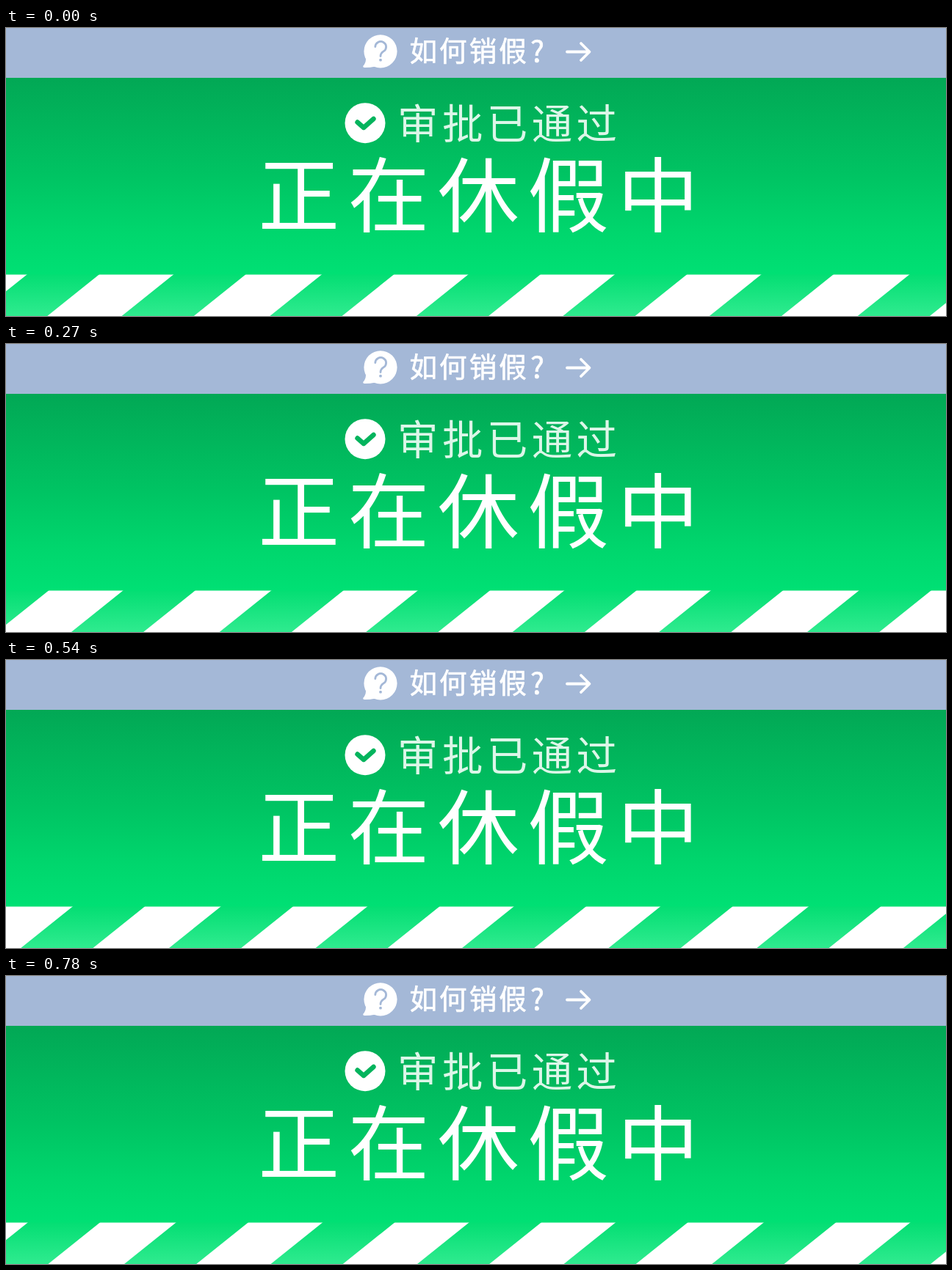
Recreate the animation shown at these times as an HTML page. Size 1280 by 393 pixels, loop 810 ms.

```html
<!DOCTYPE html>
<html lang="zh-CN">
<head>
<meta charset="utf-8">
<title>正在休假中</title>
<style>
  html, body { margin: 0; width: 100%; height: 100%; overflow: hidden; background: #fff; }
  svg { display: block; width: 100%; height: 100%; }
  text { font-family: "Noto Sans CJK SC", "Noto Sans CJK", sans-serif; fill: #fff; }
  .line { fill: none; stroke-linecap: round; stroke-linejoin: round; }
  .medium { font-size: 37.5px; letter-spacing: 3.1px; stroke: #fff; stroke-width: .7; }
  .status { font-size: 55.5px; letter-spacing: 5.4px; font-weight: 300; fill: #dcf6e8; }
  .headline { font-size: 111px; letter-spacing: 11.3px; }
</style>
</head>
<body>
<svg viewBox="0 0 1280 393">
  <defs>
    <linearGradient id="panel" x1="0" y1="0" x2="0" y2="1">
      <stop offset="0" stop-color="#02a855"/>
      <stop offset=".5" stop-color="#00c463"/>
      <stop offset=".78" stop-color="#00d66d"/>
      <stop offset="1" stop-color="#00e074"/>
    </linearGradient>
    <linearGradient id="band" gradientUnits="userSpaceOnUse" x1="0" y1="336" x2="0" y2="393">
      <stop offset="0" stop-color="#04de73"/>
      <stop offset="1" stop-color="#2feb8f"/>
    </linearGradient>
  </defs>

  <rect y="336" width="1280" height="57" fill="#fff"/>
  <path id="stripes" fill="url(#band)"/>
  <rect y="68" width="1280" height="268.5" fill="url(#panel)"/>
  <rect width="1280" height="68" fill="#a4b8d7"/>

  <circle cx="510" cy="31.8" r="22.6" fill="#fff"/>
  <path d="M490 42 Q490 48 486.5 51.5 Q485.5 54 488.5 54 Q496 54 503 52.5 Z" fill="#fff"/>
  <path class="line" d="M502.8 25.5 a7.4 7.2 0 1 1 11.2 6.4 q-4 2.6 -4 6.6" stroke="#a4b8d7" stroke-width="2.8"/>
  <circle cx="510" cy="43.7" r="1.9" fill="#a4b8d7"/>
  <text class="medium" x="549.5" y="45.3">如何销假</text>
  <text class="medium" x="714" y="46" style="font-size:40px">?</text>
  <path class="line" d="M764 32.5 H794 M783 21 L794.5 32.5 L783 44" stroke="#fff" stroke-width="3.8"/>

  <circle cx="489" cy="129.7" r="27.5" fill="#fff"/>
  <path class="line" d="M478.5 128.5 L487 136 L500.5 124" stroke="#04b45d" stroke-width="6.4"/>
  <text class="status" x="533" y="150.8">审批已通过</text>
  <text class="headline" x="343.2" y="270.2">正在休假中</text>
</svg>
<script>
  const STEP = 30, LOOP = 810;
  const TILE = 800.3, PITCH = 199.5, WIDTH = 98.2, SLANT = 71;
  const START = 430.4, SPEED = 7.63;
  const stripes = document.getElementById('stripes');

  // Four stripes per tile, with a slightly wider gap at each tile seam.
  function stripePath(offset) {
    let d = '';
    for (let tile = -1; tile <= 1; tile++) {
      for (let i = 0; i < 4; i++) {
        const x = offset + tile * TILE + i * PITCH;
        d += `M${x} 336h${WIDTH}l${-SLANT} 57h${-WIDTH}z`;
      }
    }
    return d;
  }

  const began = performance.now();
  function draw() {
    const step = Math.floor((performance.now() - began) % LOOP / STEP);
    stripes.setAttribute('d', stripePath(START - SPEED * step));
    requestAnimationFrame(draw);
  }
  draw();
</script>
</body>
</html>
```
